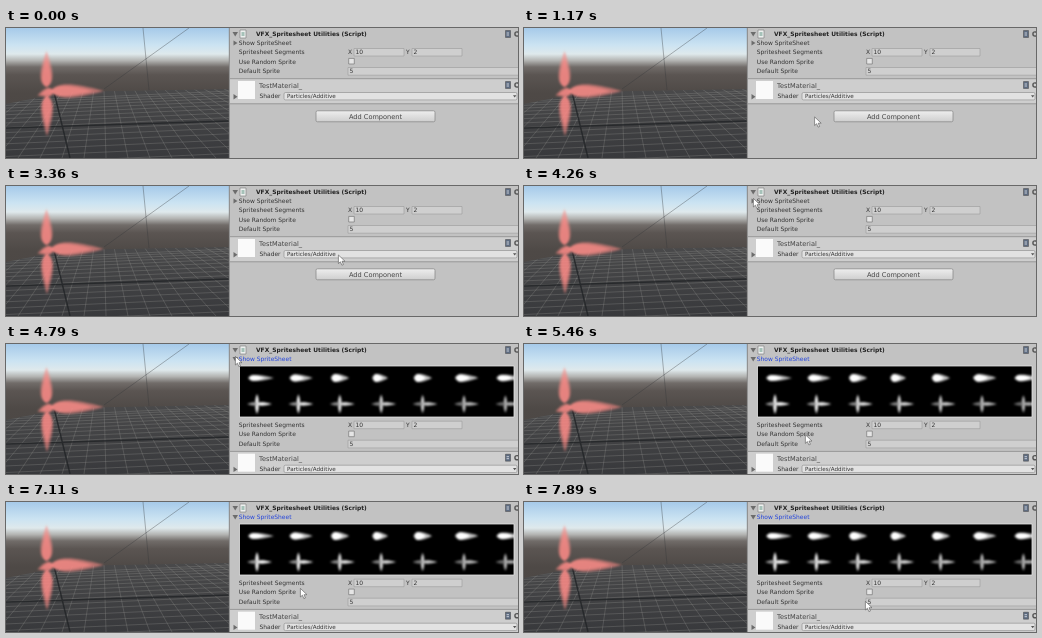
An HTML page for the animation above (8000 ms loop, 512 by 130 pixels).

```html
<!DOCTYPE html>
<html lang="en">
<head>
<meta charset="utf-8">
<title>Spritesheet inspector</title>
<style>
  html, body { margin: 0; width: 100%; height: 100%; overflow: hidden; background: #c2c2c2; }
  svg { display: block; width: 100vw; height: 100vh; }
  text { font: 5.95px "DejaVu Sans", Verdana, sans-serif; fill: #333; }
  .title { font-weight: bold; fill: #222; }
  .big { font-size: 6.6px; fill: #444; }
  .small { font-size: 5.65px; }
  .field { fill: #cfcfcf; stroke: #9a9a9a; stroke-width: .6; }
  .rule { stroke: #8d8d8d; stroke-width: .8; }
  .arrow { fill: #6c6c6c; }
  .open .shut, svg:not(.open) .sheet { display: none; }
  .open .lower { transform: translateY(56.7px); }
  .open .show { fill: #2445dc; }
</style>
</head>
<body>
<svg id="stage" viewBox="0 0 512 130" preserveAspectRatio="none">
  <defs>
    <linearGradient id="sky" x2="0" y2="1">
      <stop offset="0" stop-color="#a6cae9"/>
      <stop offset=".13" stop-color="#cbe3f2"/>
      <stop offset=".2" stop-color="#dfe9ec"/>
      <stop offset=".25" stop-color="#b3b4b2"/>
      <stop offset=".3" stop-color="#716c69"/>
      <stop offset=".36" stop-color="#5b5552"/>
      <stop offset=".5" stop-color="#4e4946"/>
      <stop offset="1" stop-color="#494543"/>
    </linearGradient>
    <linearGradient id="floor" x2="0" y2="1">
      <stop offset="0" stop-color="#4a4a4b"/>
      <stop offset="1" stop-color="#38393c"/>
    </linearGradient>
    <linearGradient id="button" x2="0" y2="1">
      <stop offset="0" stop-color="#eee"/>
      <stop offset="1" stop-color="#cecece"/>
    </linearGradient>
    <filter id="soft" x="-30%" y="-30%" width="160%" height="160%"><feGaussianBlur stdDeviation=".9"/></filter>
    <clipPath id="view"><path d="M0 0H223V130H0Z"/></clipPath>
    <clipPath id="ground"><path d="M0 76L60 64L223 61V130H0Z"/></clipPath>
    <clipPath id="sheetClip"><path d="M235 22H508V73H235Z"/></clipPath>
    <g id="tools">
      <path d="M-2.5 -3.5H2.5V3.5H-2.5Z" fill="#5d6b80" stroke="#444" stroke-width=".5"/>
      <path d="M-1.4 -1H1M-1.4 1H1" stroke="#e4e8ee" stroke-width=".8"/>
      <circle cx="9" r="2.1" fill="none" stroke="#555" stroke-width="1.4"/>
    </g>
  </defs>

  <g clip-path="url(#view)">
    <path d="M0 0H223V130H0Z" fill="url(#sky)"/>
    <g clip-path="url(#ground)">
      <path d="M0 60H223V130H0Z" fill="url(#floor)"/>
      <path id="grid" fill="none" stroke="#9a9a95" stroke-opacity=".5" stroke-width=".55"/>
      <path d="M0 100L223 93M48 64L64 130" stroke="#212326" stroke-opacity=".8" stroke-width="1.5"/>
    </g>
    <path d="M183 0L98 61M137 0L143 62" stroke="#34363a" stroke-opacity=".6" stroke-width=".6"/>
    <g id="star" fill="#f98a86" filter="url(#soft)"></g>
  </g>

  <path d="M223 0H512V130H223Z" fill="#c2c2c2"/>
  <path d="M223.3 0V130" stroke="#777" stroke-width=".8"/>
  <path class="arrow" d="M226.5 4H232L229.2 8.5Z"/>
  <path d="M234 2H240V10H234Z" fill="#eef0ef" stroke="#777" stroke-width=".6"/>
  <path d="M235.5 5H238.5M235.5 7H238.5" stroke="#4d8a75" stroke-width=".9"/>
  <text class="title" x="250" y="8.2">VFX_Spritesheet Utilities (Script)</text>
  <use href="#tools" x="502" y="6"/>
  <path class="arrow shut" d="M227.5 12.5L231.5 15L227.5 17.5Z"/>
  <path class="arrow sheet" d="M226.5 13H232L229.2 17.5Z"/>
  <text class="show" x="232.8" y="17.2">Show SpriteSheet</text>

  <g class="sheet">
    <path d="M233.5 22H508V73H233.5Z" fill="#000" stroke="#e4e4e4" stroke-width=".8"/>
    <g clip-path="url(#sheetClip)"><g id="sprites" fill="#fff" filter="url(#soft)"></g></g>
  </g>

  <g class="lower">
    <text x="232.8" y="26.2">Spritesheet Segments</text>
    <text x="342" y="26.2">X</text><path class="field" d="M348 20.5H398V28H348Z"/><text x="349.5" y="26.2">10</text>
    <text x="400" y="26.2">Y</text><path class="field" d="M406 20.5H456V28H406Z"/><text x="407.5" y="26.2">2</text>
    <text x="232.8" y="35.8">Use Random Sprite</text>
    <path d="M342.7 30.4H348.3V36H342.7Z" fill="#e5e5e5" stroke="#777" stroke-width=".7"/>
    <text x="232.8" y="45.4">Default Sprite</text>
    <path class="field" d="M342 39.5H513V47.2H342Z"/><text x="343.5" y="45.4">5</text>
    <path d="M224 51H512V75.5H224Z" fill="#cecece"/>
    <path class="rule" d="M224 50.7H512M224 75.8H512"/>
    <path d="M232 53H249V71H232Z" fill="#fafafa"/>
    <text class="big" x="253" y="60.2">TestMaterial_</text>
    <use href="#tools" x="502" y="57"/>
    <path class="arrow" d="M227.5 66L231.5 68.7L227.5 71.4Z"/>
    <text x="253.5" y="70">Shader</text>
    <rect x="278" y="64.5" width="233" height="7.4" rx="1.5" fill="#e2e2e2" stroke="#888" stroke-width=".6"/>
    <text class="small" x="281" y="70.2">Particles/Additive</text>
    <path d="M507 67.3H510.4L508.7 69.6Z" fill="#555"/>
    <rect x="310" y="82.8" width="119" height="11" rx="1.5" fill="url(#button)" stroke="#8b8b8b" stroke-width=".8"/>
    <text class="big" x="369.5" y="90.7" text-anchor="middle">Add Component</text>
  </g>

  <path id="cursor" d="M.4 .4V9L2.4 7.2L3.9 10.6L5.4 10L4 6.7H7Z" fill="#fff" stroke="#555" stroke-width=".6"/>
</svg>
<script>
  const LOOP = 8000, OPEN_AT = 4790, TICK = 110.2, FIRST = 950;
  const el = id => document.getElementById(id);
  const stage = el("stage"), cursor = el("cursor");

  function drawGrid() {
    let d = "";
    for (let i = 0; i < 16; i++) {
      const y = 64 + 1.8 * i + .19 * i * i;
      d += `M0 ${y + 9}L223 ${y - 1}`;
    }
    for (let i = -16; i < 18; i++) d += `M${108 + i * 10} 61L${122 + i * 22} 130`;
    el("grid").setAttribute("d", d);
  }

  // A spike growing from (x, y) towards the given angle.
  const petal = (x, y, angle, len, w, alpha = 1) =>
    `<path transform="translate(${x} ${y}) rotate(${angle})" fill-opacity="${alpha}"
      d="M0 0C${len * .1} ${-w} ${len * .4} ${-w} ${len} 0C${len * .4} ${w} ${len * .1} ${w} 0 0Z"/>`;

  function drawStar() {
    const spike = (x, y, angle, len, w) =>
      petal(x, y, angle, len, w, .6) + petal(x, y, angle, len * .8, w * .75, .7);
    el("star").innerHTML = spike(40.5, 59, -90, 36, 8) + spike(41, 68, 90, 40, 8) +
      spike(45, 63, 0, 53, 9) + spike(47, 63, 165, 16, 6);
  }

  function drawSprites() {
    let out = "";
    for (let i = 0; i < 7; i++) {
      const x = 251 + 41.4 * i, fade = 1 - i * .05;
      const len = 21 + 5 * Math.cos(i * 1.05), w = 4 + 1.5 * Math.sin(i * .5);
      out += petal(x - 9, 34, 0, len, w, .75) + petal(x - 8, 34, 0, len * .6, w);
      for (let k = 0; k < 4; k++) {
        out += petal(x, 60, k * 90, k ? 10 - k % 2 * i * .2 : 15, 2.2, k === 2 ? fade * .6 : fade);
      }
    }
    el("sprites").innerHTML = out;
  }

  // Pointer strokes: the pointer rests at the end of each until the next begins.
  const stroke = (from, to, d) => {
    const path = document.createElementNS("http://www.w3.org/2000/svg", "path");
    path.setAttribute("d", d);
    return { from, to, path, length: path.getTotalLength() };
  };
  const strokes = [
    stroke(0, 1, "M290 140h1"),
    stroke(950, 1950, "M288 112Q305 -60 263 136"),
    stroke(3260, 4040, "M338 73C300 45 245 2 229 12"),
    stroke(4910, 5580, "M229 13Q240 60 287 95"),
    stroke(5690, 6120, "M287 95Q244 55 288 31"),
    stroke(6130, 6580, "M288 31Q335 170 346 90"),
    stroke(6580, 7110, "M346 90Q320 82 294 86"),
    stroke(7120, 7450, "M294 86Q270 70 306 90"),
    stroke(7460, 7890, "M306 90Q335 84 341 99")
  ];

  function pointerAt(t) {
    const tick = FIRST + Math.floor((t - FIRST + 20) / TICK) * TICK;
    const now = Math.max(0, tick);
    const s = strokes.findLast(s => s.from <= now + 5);
    const p = Math.min(1, Math.max(0, (now - s.from) / (s.to - s.from)));
    return s.path.getPointAtLength(s.length * p * p * (3 - 2 * p));
  }

  const start = performance.now();
  function draw() {
    const t = (performance.now() - start) % LOOP;
    const { x, y } = pointerAt(t);
    stage.classList.toggle("open", t >= OPEN_AT);
    cursor.setAttribute("transform", `translate(${x} ${y})`);
    requestAnimationFrame(draw);
  }

  drawGrid();
  drawStar();
  drawSprites();
  draw();
</script>
</body>
</html>
```
